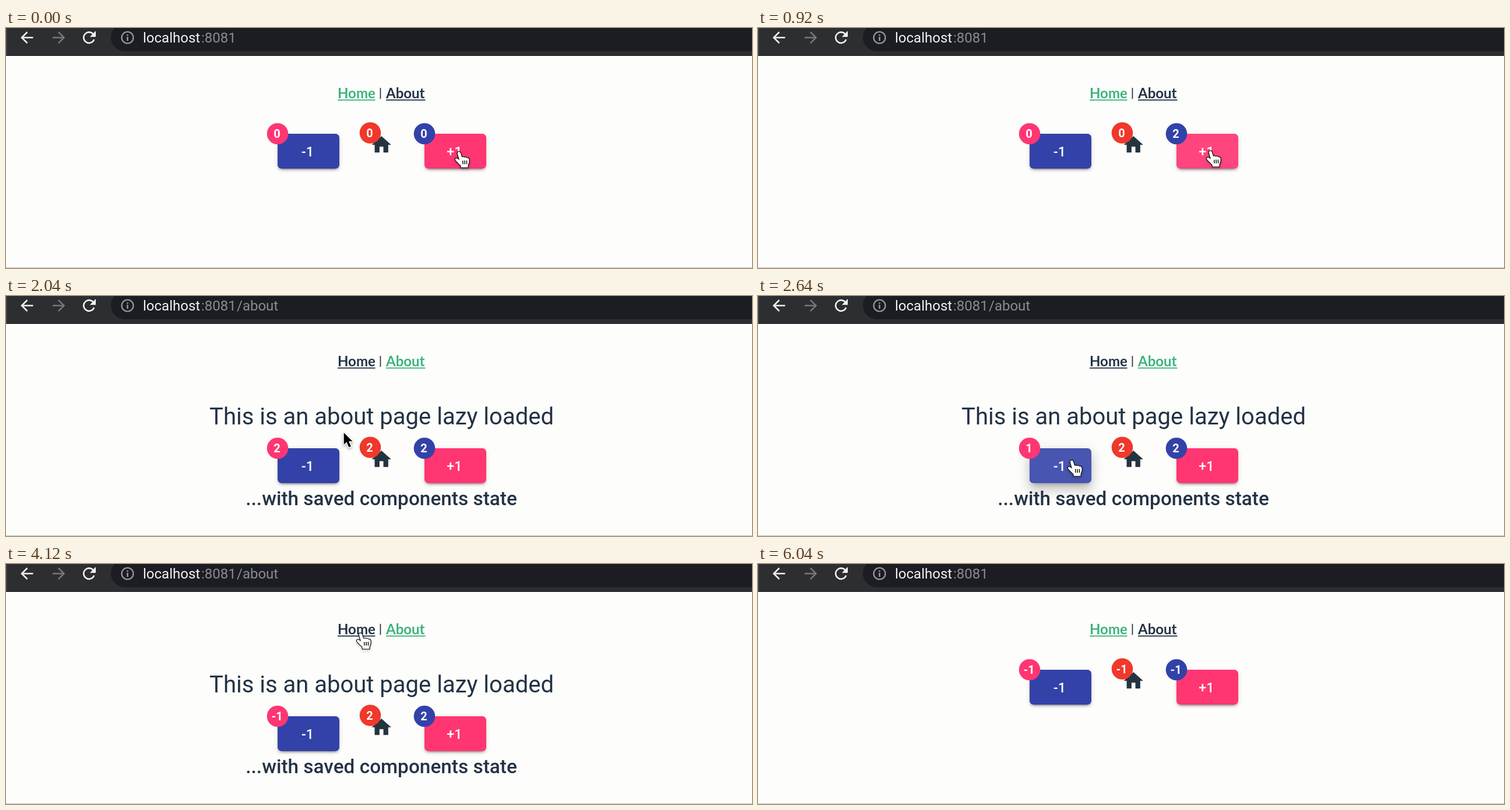
Write an HTML page with a canvas that moves like this. It is 1280 by 413 pixels and loops after 6.08 s.

```html
<!DOCTYPE html>
<html lang="en">
<head>
<meta charset="utf-8">
<title>Shared counter</title>
<style>
  html, body { margin: 0; width: 100%; height: 100%; overflow: hidden; background: #fdfdfb; }
  canvas { display: block; }
</style>
</head>
<body>
<canvas id="stage" width="1280" height="413"></canvas>
<script>
const ctx = document.getElementById('stage').getContext('2d');
const LOOP = 6080, ABOUT_AT = 1720, HOME_AT = 4400;
const INK = '#233345', BLUE = '#3342a8', PINK = '#ff3672', RED = '#f0382b', GREEN = '#3db27d';
const BUTTON = { w: 106, h: 60, r: 6.5 };
const SCALE = 5 / 3;

// Elevation layers: offset y, blur, spread, opacity
const LOW = [[3, 1, -2, .2], [2, 2, 0, .14], [1, 5, 0, .12]];
const HIGH = [[5, 5, -3, .2], [8, 10, 1, .14], [3, 14, 2, .12]];

// Presses: down time, up time
const PLUS_PRESSES = [[240, 330], [660, 740]];
const MINUS_PRESSES = [[2500, 2590], [2770, 2860], [3050, 3130]];

// Pointer stops: time, x, y, easing towards the stop
const PATH = [
  [0, 776, 213], [600, 776, 213], [900, 775, 211.5, 'both'], [1100, 775, 211.5],
  [1520, 686, 114, 'both'], [1820, 686, 114], [2040, 580, 235, 'in'], [2320, 537, 283, 'out'],
  [3280, 537, 282, 'both'], [3900, 607, 119, 'both'], [4300, 607, 119],
  [4560, 615, 117, 'both'], [4720, 615, 117], [5320, 1290, 310, 'both']
];
const EASE = {
  both: u => u * u * (3 - 2 * u),
  in: u => u * u,
  out: u => 1 - (1 - u) ** 2
};

const HAND = new Path2D('M-1.2 3Q-1.4 0 1.3 0Q3.4 0 4.2 3L6.2 9.6Q8.6 7.8 10.4 10Q12.8 8.3 14.4 10.8' +
  'Q17.8 9.6 18.6 13.2Q19.4 18 17 22L16.4 27L5 27L4.2 23.4Q0 20 -3.8 15.6Q-6.6 12.2 -3.6 11.4Q-1.4 11 2 14.4Z');
const HAND_LINES = new Path2D('M7.6 15.2L8.2 21.4M11 15L11.4 21.4M14.4 15L14.6 21.2');
const ARROW = new Path2D('M0 0V20.4L4.7 16L8.5 25L12.2 23.4L8.4 14.7H14.8Z');
const HOUSE = new Path2D('M10 20v-6h4v6h5v-8h3L12 3 2 12h3v8z');

const clamp = v => Math.max(0, Math.min(1, v));

function pointerAt(t) {
  const i = PATH.findIndex(stop => stop[0] > t);
  if (i < 0) return null;
  const [t0, x0, y0] = PATH[i - 1], [t1, x1, y1, ease = 'both'] = PATH[i];
  const u = EASE[ease]((t - t0) / (t1 - t0));
  return { x: x0 + (x1 - x0) * u, y: y0 + (y1 - y0) * u };
}

function text(str, x, y, font, color, align = 'left') {
  ctx.font = font;
  ctx.fillStyle = color;
  ctx.textAlign = align;
  ctx.fillText(str, x, y);
}

function disc(x, y, r, color) {
  ctx.fillStyle = color;
  ctx.beginPath();
  ctx.arc(x, y, r, 0, Math.PI * 2);
  ctx.fill();
}

function box(x, y, w, h, r) {
  ctx.beginPath();
  ctx.roundRect(x, y, w, h, r);
}

function line(points, color, width) {
  ctx.strokeStyle = color;
  ctx.lineWidth = width;
  ctx.beginPath();
  points.forEach(([x, y]) => ctx.lineTo(x, y));
  ctx.stroke();
}

function navArrow(x, dir, color) {
  line([[x - 10 * dir, 16.5], [x + 10 * dir, 16.5]], color, 2.5);
  line([[x, 7], [x - 9.5 * dir, 16.5], [x, 26]], color, 2.5);
}

function toolbar(about) {
  ctx.fillStyle = '#2d2e31';
  ctx.fillRect(0, 0, 1280, 48);
  ctx.fillStyle = '#48494c';
  ctx.fillRect(0, 0, 1.5, 47);
  ctx.fillStyle = '#121316';
  ctx.fillRect(0, 47, 1280, 1);
  ctx.fillStyle = '#1b1d22';
  box(180, -8, 1200, 48, 24);
  ctx.fill();

  navArrow(36.5, 1, '#f4f4f4');
  navArrow(90, -1, '#77787b');

  ctx.strokeStyle = '#f4f4f4';
  ctx.lineWidth = 2.6;
  ctx.beginPath();
  ctx.arc(142.5, 16.5, 9.3, .35, Math.PI * 1.76);
  ctx.stroke();
  ctx.fillStyle = '#f4f4f4';
  ctx.fill(new Path2D('M154 5V15.2H143.8Z'));

  ctx.strokeStyle = '#9b9c9f';
  ctx.lineWidth = 2.2;
  ctx.beginPath();
  ctx.arc(208.5, 16.5, 10, 0, Math.PI * 2);
  ctx.stroke();
  ctx.fillStyle = '#9b9c9f';
  ctx.fillRect(207.3, 15, 2.4, 7);
  ctx.fillRect(207.3, 11, 2.4, 2.4);

  const font = '24px Roboto, sans-serif';
  text('localhost', 235, 25, font, '#f2f2f2');
  text(':8081', 335, 25, font, '#8b8c90');
  if (about) text('/about', 396, 25, font, '#8b8c90');
}

function link(label, x, width, color) {
  text(label, x, 121, 'bold 24px Lato, sans-serif', color);
  ctx.fillStyle = color;
  ctx.fillRect(x, 123, width, 1.8);
}

function shadows(layers, x, y, strength) {
  const far = 3000;
  ctx.save();
  ctx.fillStyle = '#000';
  for (const [dy, blur, spread, alpha] of layers) {
    const s = spread * SCALE;
    ctx.shadowColor = `rgba(0,0,0,${alpha * strength})`;
    ctx.shadowBlur = blur * SCALE;
    ctx.shadowOffsetX = far;
    ctx.shadowOffsetY = dy * SCALE;
    box(x - s - far, y - s, BUTTON.w + 2 * s, BUTTON.h + 2 * s, BUTTON.r);
    ctx.fill();
  }
  ctx.restore();
}

function ripple(t, down, up, x, y) {
  const end = Math.max(down + 225, up);
  if (t < down || t > end + 150) return;
  const u = clamp((t - down) / 225);
  const grow = 1 - (1 - u) ** 3;
  const p = pointerAt(down);
  const reach = Math.hypot(Math.max(p.x - x, x + BUTTON.w - p.x), Math.max(p.y - y, y + BUTTON.h - p.y));
  const alpha = .1 * clamp(u * 3) * (1 - clamp((t - end) / 150));
  disc(p.x, p.y, reach * grow, `rgba(255,255,255,${alpha})`);
}

function button(label, x, y, color, presses, t) {
  const lift = Math.max(...presses.map(([down, up]) =>
    EASE.both(clamp((t - down) / 80)) * (1 - EASE.both(clamp((t - up) / 180)))));
  shadows(LOW, x, y, 1 - lift);
  if (lift > 0) shadows(HIGH, x, y, lift);
  ctx.save();
  box(x, y, BUTTON.w, BUTTON.h, BUTTON.r);
  ctx.fillStyle = color;
  ctx.fill();
  ctx.clip();
  presses.forEach(([down, up]) => ripple(t, down, up, x, y));
  ctx.restore();
  text(label, x + 51.5, y + 38.5, '500 23.33px Roboto, sans-serif', '#fff', 'center');
}

function badge(value, x, y, color) {
  disc(x, y, 18.3, color);
  text(value, x - 1, y + 7.2, 'bold 20px Roboto, sans-serif', '#fff', 'center');
}

function counters(t, top, values) {
  button('-1', 466, top, BLUE, MINUS_PRESSES, t);
  button('+1', 718, top, PINK, PLUS_PRESSES, t);
  ctx.save();
  ctx.translate(624.2, top - 1);
  ctx.scale(SCALE, SCALE);
  ctx.fillStyle = '#253540';
  ctx.fill(HOUSE);
  ctx.restore();
  badge(values[0], 466, top, PINK);
  badge(values[1], 625, top - 1.5, RED);
  badge(values[2], 718, top, BLUE);
}

function pointer(p, top) {
  const inside = (x, y, w, h) => p.x >= x && p.x <= x + w && p.y >= y && p.y <= y + h;
  const hand = inside(569, 99, 64, 28) || inside(652, 99, 67, 28) ||
    inside(466, top, BUTTON.w, BUTTON.h) || inside(718, top, BUTTON.w, BUTTON.h);
  const shape = hand ? HAND : ARROW;
  ctx.save();
  ctx.translate(p.x, p.y);
  ctx.lineJoin = 'round';
  ctx.strokeStyle = hand ? '#000' : '#fff';
  ctx.lineWidth = hand ? 2.2 : 3;
  ctx.shadowColor = 'rgba(0,0,0,.35)';
  ctx.shadowBlur = 4;
  ctx.shadowOffsetY = 2;
  ctx.stroke(shape);
  ctx.shadowColor = 'transparent';
  ctx.fillStyle = hand ? '#fff' : '#000';
  ctx.fill(shape);
  if (hand) {
    ctx.lineWidth = 1.4;
    ctx.stroke(HAND_LINES);
  }
  ctx.restore();
}

function draw(t) {
  const about = t >= ABOUT_AT && t < HOME_AT;
  const top = about ? 262 : 182;
  const clicks = presses => presses.filter(([, up]) => t >= up).length;
  const total = clicks(PLUS_PRESSES) - clicks(MINUS_PRESSES);
  const values = about ? [total, 2, 2] : t < ABOUT_AT ? [0, 0, total] : [total, total, total];

  ctx.fillStyle = '#fdfdfb';
  ctx.fillRect(0, 0, 1280, 413);
  ctx.fillStyle = '#bdbbb2';
  ctx.fillRect(0, 412, 1280, 1);
  toolbar(about);

  link('Home', 569, 64.5, about ? INK : GREEN);
  link('About', 652, 67.5, about ? GREEN : INK);
  ctx.fillStyle = INK;
  ctx.fillRect(641.6, 103, 1.7, 19);

  if (about) {
    text('This is an about page lazy loaded', 644.5, 221, '40px Roboto, sans-serif', INK, 'center');
    text('...with saved components state', 644, 360, '500 33.33px Roboto, sans-serif', INK, 'center');
  }
  counters(t, top, values);

  const p = pointerAt(t);
  if (p) pointer(p, top);
}

function frame() {
  draw(performance.now() % LOOP);
  requestAnimationFrame(frame);
}
frame();
</script>
</body>
</html>
```
